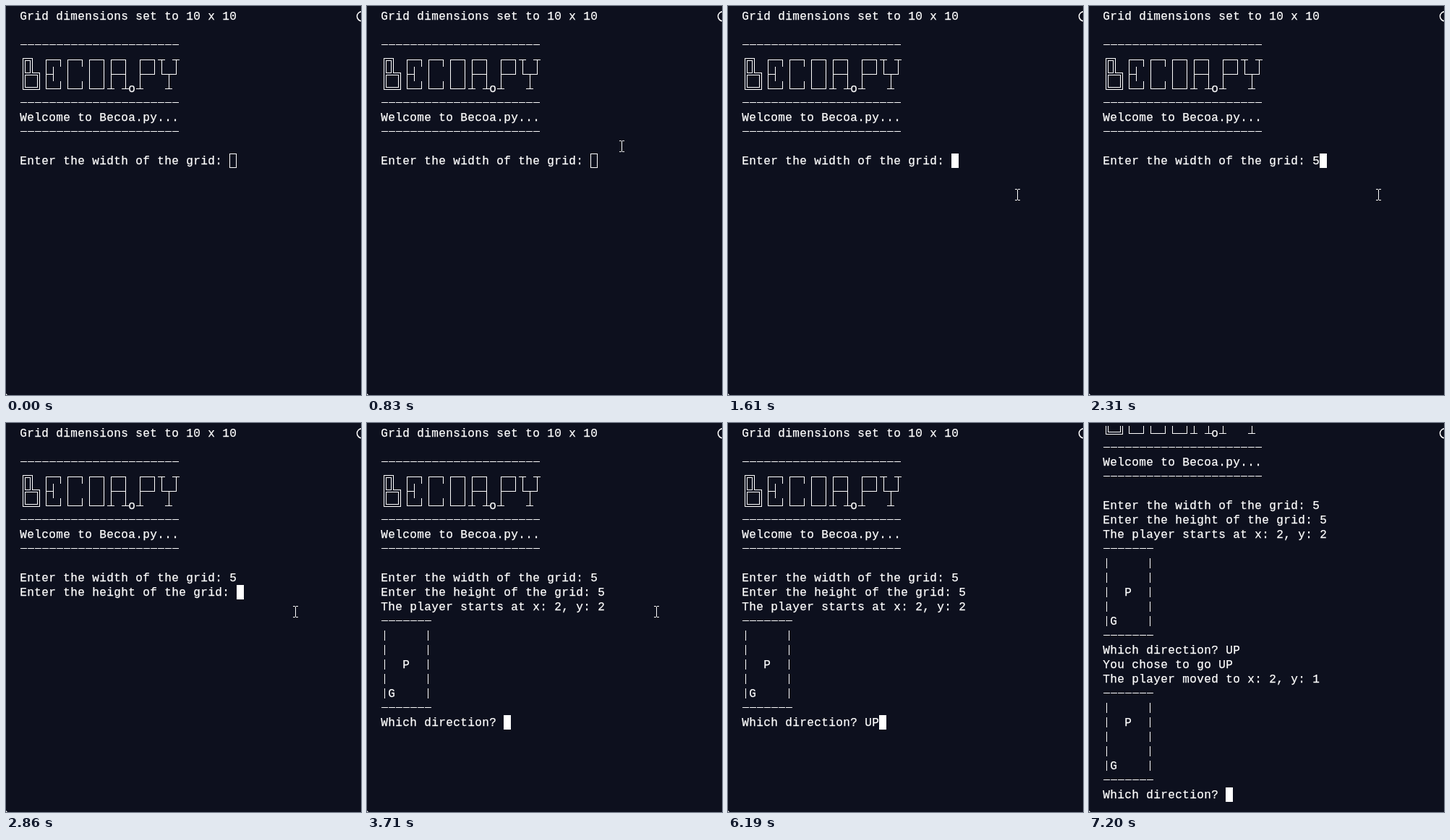
Animation of 491 by 538 pixels, one loop 8000 ms. Source, as an HTML page with a canvas:

```html
<!DOCTYPE html>
<html lang="en">
<head>
<meta charset="utf-8">
<title>Terminal game</title>
<style>
html, body { margin: 0; width: 100%; height: 100%; overflow: hidden; background: #0d101e; }
canvas { display: block; }
</style>
</head>
<body>
<canvas id="stage" width="491" height="538"></canvas>
<script>
const ctx = document.getElementById('stage').getContext('2d');
const W = 491, H = 538, LOOP = 8000;
const LEFT = 19, TOP = 4, CW = 10, CH = 20;
const BG = '#0d101e', INK = '#fff';
const FONT_SIZE = 16, GAP = CW - FONT_SIZE * 0.6;

// Arms of each box character: up, right, down, left.
const ARMS = {
  '┌': '0110', '─': '0101', '┐': '0011', '│': '1010', '└': '1100', '┘': '1001',
  '┬': '0111', '┴': '1101', '├': '1110', '┤': '1011',
  '╔': '0220', '╗': '0022', '╚': '2200', '╝': '2002', '╠': '2220', '╩': '2202', '═': '0202'
};

const rule = n => '-'.repeat(n);
const HEAD = [
  'Grid dimensions set to 10 x 10',
  '',
  rule(22),
  '╔╗ ┌─┐┌─┐┌─┐┌─┐ ┌─┐┬ ┬',
  '╠╩╗├┤ │  │ │├─┤ ├─┘└┬┘',
  '╚═╝└─┘└─┘└─┘┴ ┴o┴   ┴',
  rule(22),
  'Welcome to Becoa.py...',
  rule(22),
  ''
];

function board(px, py) {
  const rows = [];
  for (let y = 0; y < 5; y++) {
    let row = '';
    for (let x = 0; x < 5; x++) {
      row += x === px && y === py ? 'P' : x === 0 && y === 4 ? 'G' : ' ';
    }
    rows.push('|' + row + '|');
  }
  return [rule(7), ...rows, rule(7)];
}

function linesAt(t) {
  const out = [...HEAD, 'Enter the width of the grid: ' + (t >= 2310 ? '5' : '')];
  if (t >= 2860) out.push('Enter the height of the grid: ' + (t >= 3390 ? '5' : ''));
  if (t >= 3710) {
    const typed = t >= 6190 ? 'UP' : t >= 6110 ? 'U' : '';
    out.push('The player starts at x: 2, y: 2', ...board(2, 2), 'Which direction? ' + typed);
  }
  if (t >= 7200) {
    out.push('You chose to go UP', 'The player moved to x: 2, y: 1', ...board(2, 1), 'Which direction? ');
  }
  return out;
}

// Pointer moves as [time, x, y]; each place holds until the next.
const MOVES = [
  [140, 412, 531], [220, 407, 470], [300, 396, 392], [380, 381, 310],
  [460, 365, 238], [530, 352, 188], [610, 345, 166], [690, 346, 170],
  [760, 350, 184], [830, 352, 194], [910, 351, 194], [980, 345, 210],
  [1060, 340, 206], [1210, 358, 211], [1290, 398, 224], [1370, 430, 241],
  [1450, 437, 252], [1530, 415, 259], [1610, 400, 261], [4640, 480, 324]
];

function pointerAt(t) {
  if (t >= 4720) return null;
  return MOVES.filter(m => t >= m[0]).pop();
}

function drawBox(ch, x, y) {
  const cx = x + 5, cy = y + 10;
  const [u, r, d, l] = [...ARMS[ch]].map(Number);
  const a = Math.max(u, r, d, l) === 2 ? 1.5 : 0;
  const px = v => Math.floor(v);
  const hor = (x0, x1, yy) => ctx.fillRect(px(x0), px(yy), px(x1) - px(x0), 1);
  const ver = (y0, y1, xx) => ctx.fillRect(px(xx), px(y0), 1, px(y1) - px(y0));
  const end = side => side ? -a : a;
  for (const s of a ? [-1, 1] : [0]) {
    const sideX = s < 0 ? l : r, sideY = s < 0 ? u : d;
    if (u) ver(y, cy + end(sideX) + 1, cx + s * a);
    if (d) ver(cy - end(sideX), y + CH, cx + s * a);
    if (l) hor(x, cx + end(sideY) + 1, cy + s * a);
    if (r) hor(cx - end(sideY), x + CW, cy + s * a);
  }
}

function drawLine(line, y) {
  let plain = '';
  [...line].forEach((ch, i) => {
    const x = LEFT + i * CW;
    let shape = true;
    if (ARMS[ch]) drawBox(ch, x + 1, y);
    else if (ch === '-') ctx.fillRect(x + 1, y + 9, 9, 1);
    else if (ch === '|') ctx.fillRect(x + 5, y + 3, 1, 14);
    else shape = false;
    plain += shape ? ' ' : ch;
  });
  if (!plain.trim()) return;
  ctx.lineWidth = 0.25;
  ctx.fillText(plain, LEFT + GAP / 2, y + 15);
  ctx.strokeText(plain, LEFT + GAP / 2, y + 15);
}

function drawPointer(x, y) {
  ctx.fillRect(x, y - 7, 1, 14);
  for (const yy of [y - 8, y + 7]) {
    ctx.fillRect(x - 3, yy, 3, 1);
    ctx.fillRect(x + 1, yy, 3, 1);
  }
}

function drawEdges() {
  ctx.lineWidth = 1.5;
  ctx.beginPath();
  ctx.arc(492, 14.3, 6.5, 0, Math.PI * 2);
  ctx.stroke();
  ctx.beginPath();
  ctx.moveTo(0, H - 2);
  ctx.lineTo(2, H);
  ctx.lineTo(0, H);
  ctx.fill();
}

function draw(t) {
  ctx.fillStyle = BG;
  ctx.fillRect(0, 0, W, H);
  ctx.font = FONT_SIZE + 'px "Liberation Mono", monospace';
  ctx.letterSpacing = GAP + 'px';
  ctx.fillStyle = ctx.strokeStyle = INK;

  const all = linesAt(t);
  const lines = all.slice(t >= 7200 ? 5 : 0);
  lines.forEach((line, i) => drawLine(line, TOP + i * CH));

  const last = lines.length - 1;
  const x = LEFT + lines[last].length * CW, y = TOP + last * CH;
  ctx.lineWidth = 1;
  if (t >= 1610) ctx.fillRect(x, y, CW, CH);
  else ctx.strokeRect(x + 0.5, y + 0.5, CW - 1, CH - 1);

  drawEdges();
  const p = pointerAt(t);
  if (p) drawPointer(p[1], p[2]);
}

const start = performance.now();
function tick() {
  draw((performance.now() - start) % LOOP);
  requestAnimationFrame(tick);
}
tick();
</script>
</body>
</html>
```
